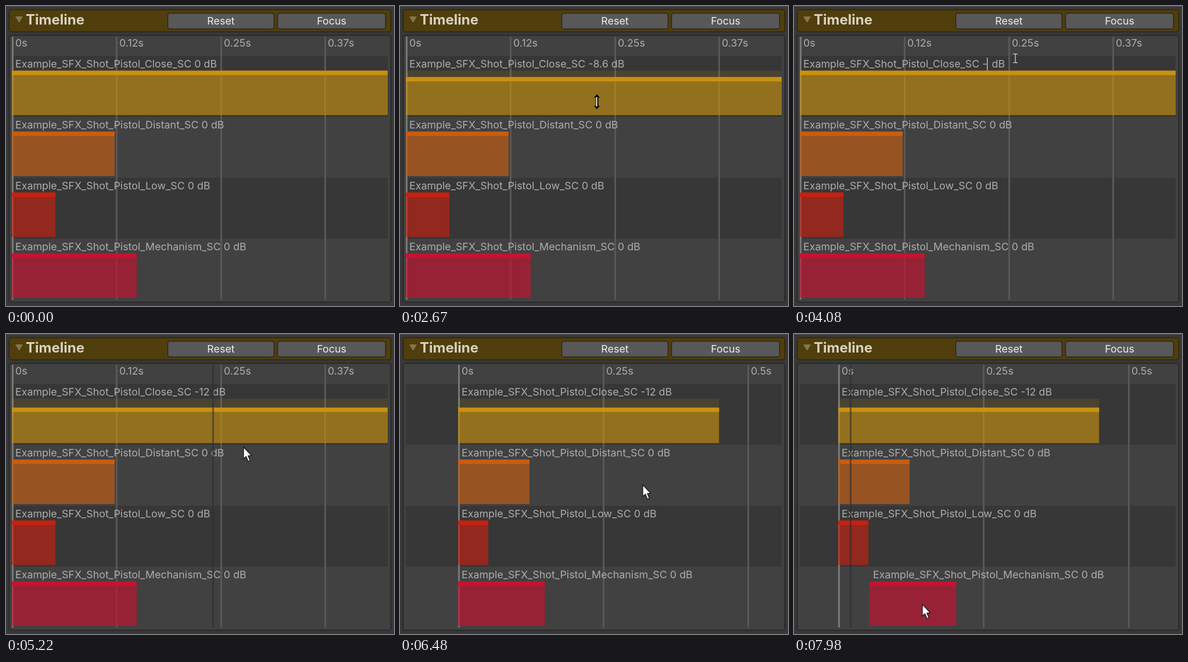
An HTML page with a canvas that plays this animation: 668x517 px, repeating every 8 s.

```html
<!DOCTYPE html>
<html lang="en">
<head>
<meta charset="utf-8">
<title>Timeline</title>
<style>
  html, body { margin: 0; height: 100%; overflow: hidden; background: #383838; }
  canvas { display: block; }
</style>
</head>
<body>
<canvas width="668" height="517"></canvas>
<script>
const ctx = document.querySelector('canvas').getContext('2d');
const LOOP = 8000, LEFT = 10, RIGHT = 657, PX_PER_SEC = 1436, CLIP_H = 76.5;
const ZOOM_X = 421, ZOOM_TIMES = [5640, 5880];
const PLAY_TIMES = [1452, 2968, 4980, 7270, 7960], PLAY_MS = 450;
const TYPED = '-12', TYPE_START = 4080, KEY_MS = 80;
const CLIPS = [
  { name: 'Close', rgb: '204,147,15', width: 647 },
  { name: 'Distant', rgb: '204,94,14', width: 177 },
  { name: 'Low', rgb: '204,32,16', width: 75 },
  { name: 'Mechanism', rgb: '204,16,48', width: 215 },
];
// Pointer gestures: start, duration, dx, dy, and what is dragged along.
const GESTURES = [
  [530, 300, 402, -174],
  [1110, 400, -36, -131],
  [1600, 300, -27, 57],
  [2220, 600, 0, 12.9, 'volume'],
  [3060, 590, 42, -77],
  [4750, 740, 40, 150],
  [6090, 120, 32, 18],
  [6260, 390, -59, 4, 'pan'],
  [6690, 310, -217, 193],
  [7000, 250, 32, 2, 'shift'],
  [7300, 400, -10, 7],
  [7740, 200, 22, 2, 'shift'],
];

function stateAt(t) {
  const s = { t, x: 0, y: 402, volume: 0, pan: 0, shift: 0 };
  for (const [start, duration, dx, dy, dragged] of GESTURES) {
    const u = Math.min(Math.max((t - start) / duration, 0), 1), e = u * u * (3 - 2 * u);
    s.x += dx * e;
    s.y += dy * e;
    if (dragged) s[dragged] += (dragged === 'volume' ? dy : dx) * e;
    if (u > 0 && u < 1) s.dragging = dragged;
  }
  s.origin = LEFT;
  s.scale = 1;
  for (const z of ZOOM_TIMES) if (t >= z) {
    s.origin += (ZOOM_X - s.origin) / 6;
    s.scale /= 1.2;
  }
  s.origin += s.pan;
  s.timeX = sec => Math.floor(s.origin + sec * PX_PER_SEC * s.scale);
  return s;
}

function rect(x, y, w, h, color) {
  ctx.fillStyle = color;
  ctx.fillRect(x, y, w, h);
}

function box(x, y, w, h, fill, border) {
  ctx.beginPath();
  ctx.roundRect(x + .5, y + .5, w - 1, h - 1, 4);
  ctx.fillStyle = fill;
  ctx.fill();
  ctx.strokeStyle = border;
  ctx.lineWidth = 1.5;
  ctx.stroke();
}

function text(str, x, y, color = '#adadad', font = '17.85px Inter, sans-serif') {
  ctx.font = font;
  ctx.fillStyle = color;
  ctx.fillText(str, x, y);
  return x + ctx.measureText(str).width;
}

function polygon(points, fill) {
  ctx.beginPath();
  points.forEach(p => ctx.lineTo(...p));
  ctx.closePath();
  ctx.fillStyle = fill;
  ctx.fill();
}

function button(label, x, w) {
  box(x, 12, w, 28, '#585858', '#262626');
  ctx.textAlign = 'center';
  text(label, x + w / 2, 32, '#eeeeee');
  ctx.textAlign = 'left';
}

function header() {
  box(5, 6, 658, 39, '#503e0d', '#2e2408');
  polygon([[16, 18], [29, 18], [22.5, 29]], '#85774e');
  text('Timeline', 34, 32, '#d9d3c0', 'bold 24px Inter, sans-serif');
  button('Reset', 278, 184);
  button('Focus', 467, 187);
}

function grid(s) {
  const step = s.scale < .75 ? .25 : .125;
  for (let sec = 0; s.timeX(sec) < RIGHT; sec += step) {
    const x = s.timeX(sec);
    rect(x, 53, 3, 453, sec ? '#585858' : '#777777');
    text(Math.floor(sec * 100) / 100 + 's', x + 6, 70);
  }
}

function volumeField({ t, volume }) {
  if (t < TYPE_START) {
    const db = -Math.round(volume / 76 * 600) / 10 || 0;
    return { db, label: `${db}`, selected: t >= 3620 };
  }
  const keys = 1 + Math.floor((t - TYPE_START) / KEY_MS), label = TYPED.slice(0, keys);
  return { db: parseFloat(label) || 0, label, caret: keys <= TYPED.length };
}

function clip(c, i, s) {
  const field = i ? { db: 0, label: '0' } : volumeField(s);
  const x = Math.floor(s.origin + (c.name === 'Mechanism' ? s.shift : 0));
  const w = c.width * s.scale, top = 111.5 + i * 105;
  const drop = -field.db / 60 * CLIP_H;
  rect(x, top, w, drop, `rgba(${c.rgb},.13)`);
  rect(x, top + drop, w, CLIP_H - drop, `rgba(${c.rgb},.62)`);
  rect(x, top + drop, w, 7.5, `rgba(${c.rgb},.95)`);

  const base = 106 + i * 105;
  const numX = text(`Example_SFX_Shot_Pistol_${c.name}_SC `, x + 6, base);
  const numW = ctx.measureText(field.label).width;
  if (field.selected) rect(numX, 89, numW, 22, 'rgba(61,128,223,.6)');
  text(field.label, numX, base);
  text(' dB', numX + ctx.measureText(`${field.db}`).width, base);
  if (field.caret) rect(Math.round(numX + numW), 89, 1.3, 22, '#d0d0d0');
}

function playhead(s) {
  const start = PLAY_TIMES.find(p => s.t > p && s.t < p + PLAY_MS);
  if (start) rect(s.timeX((s.t - start) / 1000) - 1, 53, 3, 453, 'rgba(45,45,45,.6)');
}

function pointer({ t, x, y, dragging }) {
  if (t < GESTURES[0][0]) return;
  ctx.save();
  ctx.translate(Math.round(x), Math.round(y));
  if (y < 111) {
    rect(-.5, -7, 1.3, 15, '#d4d4d4');
    for (const end of [-8, 7]) rect(-4, end, 8, 1.2, '#d4d4d4');
  } else if (dragging === 'volume') {
    for (const d of [-1, 1]) polygon([[0, d * 13], [-5, d * 7], [5, d * 7]], '#000');
    rect(-2.5, -8, 5, 16, '#000');
    rect(-1.5, -8, 2, 16, '#fff');
  } else {
    polygon([[0, 0], [0, 20], [4.5, 16], [8, 24.5], [11.2, 23], [7.8, 15], [13.5, 14.4]], '#fff');
    ctx.strokeStyle = '#111';
    ctx.lineWidth = 1.2;
    ctx.stroke();
  }
  ctx.restore();
}

function draw(t) {
  const s = stateAt(t);
  rect(0, 0, 668, 517, '#383838');
  rect(0, 0, 668, 1, '#555555');
  header();
  box(5, 50, 658, 461, '#414141', '#242424');
  for (const y of [86, 296]) rect(LEFT, y, RIGHT - LEFT, 105, '#373737');
  grid(s);
  CLIPS.forEach((c, i) => clip(c, i, s));
  playhead(s);
  pointer(s);
}

function frame() {
  draw(performance.now() % LOOP);
  requestAnimationFrame(frame);
}
frame();
</script>
</body>
</html>
```
